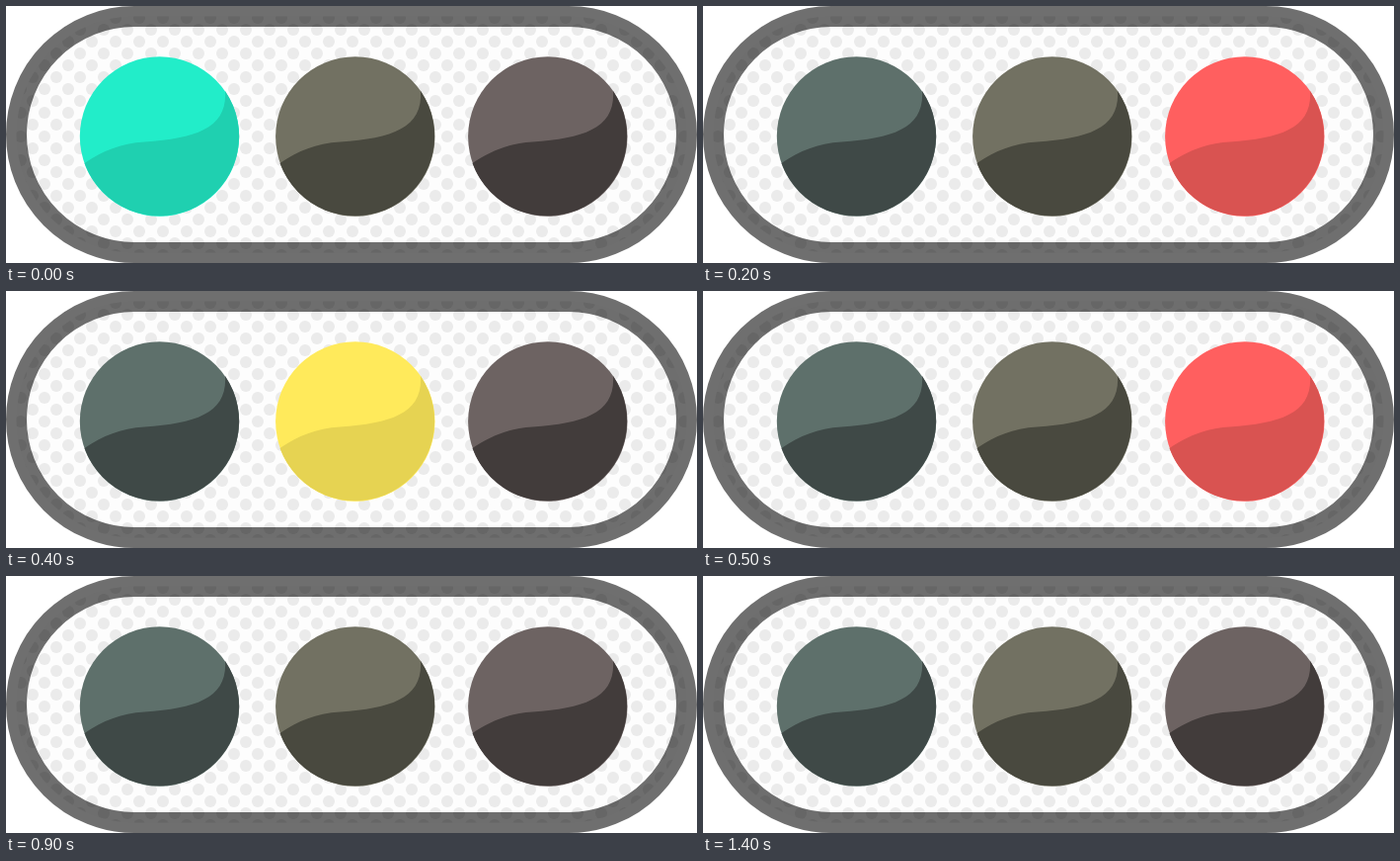
Write an HTML page that moves like this. It is 700 px wide and 260 px high and loops after 1600 ms.

```html
<!DOCTYPE html>
<html lang="en">
<head>
<meta charset="utf-8">
<title>Three lamps</title>
<style>
  html, body { margin: 0; width: 100%; height: 100%; overflow: hidden; background: #fff; }
  svg { display: block; width: 100%; height: 100%; }
</style>
</head>
<body>
<svg viewBox="0 0 700 260">
  <defs>
    <pattern id="dots" x="27" y="120" width="24" height="24" patternUnits="userSpaceOnUse">
      <rect width="24" height="24" fill="#fdfdfd"/>
      <g fill="#ebebeb">
        <circle cx="12" cy="12" r="6"/>
        <circle cx="0" cy="0" r="6"/>
        <circle cx="24" cy="0" r="6"/>
        <circle cx="0" cy="24" r="6"/>
        <circle cx="24" cy="24" r="6"/>
      </g>
    </pattern>
  </defs>
  <rect x="10.5" y="10.5" width="679" height="239" rx="119.5"
        fill="url(#dots)" stroke="#000" stroke-opacity=".565" stroke-width="21"/>
  <g id="lamps"></g>
</svg>
<script>
  const LOOP = 1600;
  const SHADE = "M-76,27 C-57,14.5 -40,7 -15,5.5 C38,2 69,-9 66.5,-46 A80.7,80.7 0 1 1 -76,27 Z";

  // Colours are [light part, shaded part]
  const lamps = [
    { x: 155.5, rim: 0, on: ["#22edc9", "#1fd0b0"], off: ["#5e706b", "#3f4947"] },
    { x: 353.5, rim: 0.3, on: ["#ffea5b", "#e6d352"], off: ["#727162", "#49493f"] },
    { x: 548.5, rim: 0.3, on: ["#ff5f5f", "#d95351"], off: ["#6d6362", "#423c3b"] }
  ];

  function add(parent, tag, attrs) {
    const el = document.createElementNS("http://www.w3.org/2000/svg", tag);
    for (const key in attrs) el.setAttribute(key, attrs[key]);
    return parent.appendChild(el);
  }

  const root = document.getElementById("lamps");
  for (const lamp of lamps) {
    const group = add(root, "g", { transform: `translate(${lamp.x} 132)` });
    lamp.parts = [
      add(group, "circle", { cx: lamp.rim, r: 80.7 }),
      add(group, "path", { d: SHADE })
    ];
  }

  // Two quick chases from left to right, then two flashes of all lamps
  function isLit(index, t) {
    if (t < 600) return Math.floor(t / 100) % 3 === index;
    return t < 900 || (t >= 1100 && t < 1400);
  }

  function draw(t) {
    lamps.forEach((lamp, i) => {
      const colors = isLit(i, t) ? lamp.on : lamp.off;
      lamp.parts.forEach((part, k) => part.setAttribute("fill", colors[k]));
    });
  }

  const start = performance.now();
  function tick() {
    draw((performance.now() - start) % LOOP);
    requestAnimationFrame(tick);
  }
  tick();
</script>
</body>
</html>
```
